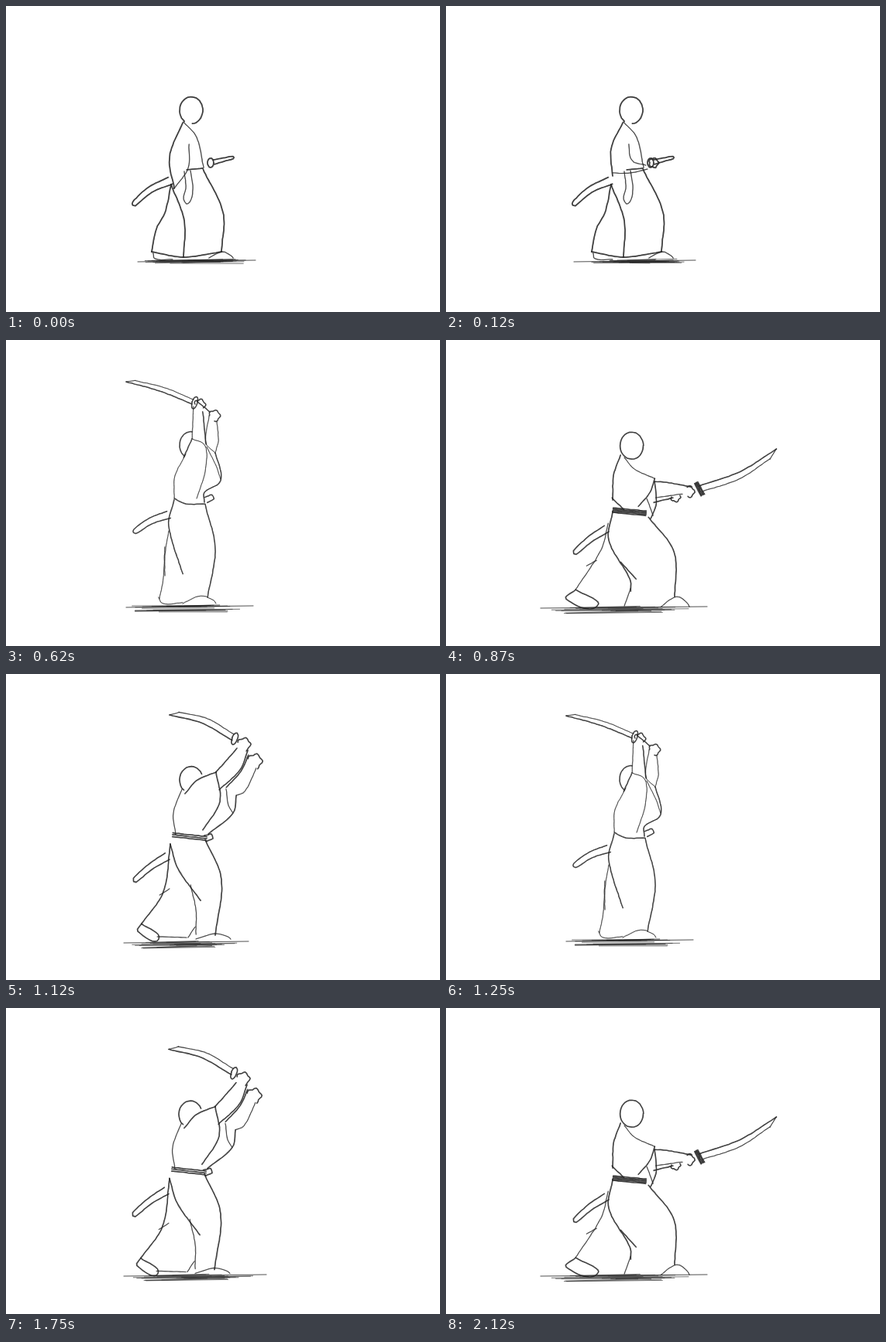
These frames come from a looping animation (560x396 px, 2.25 s). An HTML page:

```html
<!DOCTYPE html>
<html lang="en">
<head>
<meta charset="utf-8">
<title>Sword practice</title>
<style>
html, body { margin: 0; width: 100%; height: 100%; overflow: hidden; background: #fff; }
svg { display: block; width: 100%; height: 100%; }
path { fill: none; stroke: #242424; stroke-linecap: round; stroke-linejoin: round; }
</style>
</head>
<body>
<svg id="stage" viewBox="0 0 560 396"></svg>
<script>
const NS = 'http://www.w3.org/2000/svg';
const stage = document.getElementById('stage');
let layer, weight, seed, offset = [0, 0];

const rand = () => (seed = (seed * 16807) % 2147483647) / 2147483647;
const noise = size => (rand() - .5) * size;

function addPath(d, width, opacity) {
  const path = document.createElementNS(NS, 'path');
  path.setAttribute('d', d);
  path.style.strokeWidth = width;
  path.style.strokeOpacity = opacity;
  layer.append(path);
}

// Samples a smooth line through flat x, y pairs.
function sample(flat) {
  const p = [];
  for (let i = 0; i < flat.length; i += 2) p.push([flat[i] + offset[0], flat[i + 1] + offset[1]]);
  const at = i => p[Math.max(0, Math.min(p.length - 1, i))];
  const out = [p[0]];
  for (let i = 0; i < p.length - 1; i++) {
    const [a, b, c, e] = [at(i - 1), at(i), at(i + 1), at(i + 2)];
    const len = Math.hypot(c[0] - b[0], c[1] - b[1]);
    const toward = (from, to) => {
      const d = Math.hypot(to[0] - from[0], to[1] - from[1]) || 1;
      return [0, 1].map(k => (to[k] - from[k]) / d * len / 3);
    };
    const [u, v] = [toward(a, c), toward(b, e)];
    const steps = Math.ceil(len / 4);
    for (let s = 1; s <= steps; s++) {
      const t = s / steps, r = 1 - t;
      out.push([0, 1].map(k => r * r * r * b[k] + 3 * r * r * t * (b[k] + u[k])
        + 3 * r * t * t * (c[k] - v[k]) + t * t * t * c[k]));
    }
  }
  return out;
}

// Two shaky passes of the pencil.
function stroke(flat, heavy) {
  const points = sample(flat);
  for (const [shake, width, opacity] of [[.5, 1, .75], [1.1, .6, .6]]) {
    const d = 'M' + points.map(([x, y]) => `${x + noise(shake)},${y + noise(shake)}`).join('L');
    addPath(d, weight * heavy * width, opacity);
  }
}

const curve = (...p) => stroke(p, 1);
const bold = (...p) => stroke(p, 1.5);

function ellipse(cx, cy, rx, ry, from = 0, to = 360, turn = 0, knuckle = 0) {
  const points = [];
  for (let i = 0; i <= 16; i++) {
    const a = (from + (to - from) * i / 16) * Math.PI / 180;
    const r = 1 + knuckle * Math.cos(5 * a);
    const [x, y] = [rx * r * Math.cos(a), ry * r * Math.sin(a)];
    points.push(cx + x * Math.cos(turn) - y * Math.sin(turn), cy + x * Math.sin(turn) + y * Math.cos(turn));
  }
  bold(...points);
}
const head = (cx, cy, from, to) => ellipse(cx, cy, 15, 17.5, from, to);
const fist = (x, y, r, from = 0, to = 360) => ellipse(x, y, r, r, from, to, 0, .13);

// Gives points beside a bent axis: t runs along it, w across it.
function axis(x0, y0, x1, y1, bend) {
  const [dx, dy] = [x1 - x0, y1 - y0];
  const len = Math.hypot(dx, dy);
  return (t, w) => {
    const side = w + 4 * bend * t * (1 - t);
    return [x0 + dx * t - dy / len * side, y0 + dy * t + dx / len * side];
  };
}

function tube(x0, y0, x1, y1, w0, w1, bend = 0) {
  const at = axis(x0, y0, x1, y1, bend);
  const mid = (w0 + w1) / 2;
  bold(...at(0, w0), ...at(.5, mid), ...at(1, w1), ...at(1.04, 0), ...at(1, -w1), ...at(.5, -mid), ...at(0, -w0));
}

// Parallel lines; many of them make a solid band.
function band(x0, y0, x1, y1, height, lines) {
  const at = axis(x0, y0, x1, y1, 0);
  for (let i = 0; i < lines; i++) {
    const w = height * (i / (lines - 1) - .5);
    bold(...at(0, w), ...at(1, w));
  }
}

function blade(x0, y0, x1, y1, w, bend, solidGuard) {
  const at = axis(x0, y0, x1, y1, bend);
  curve(...at(0, w), ...at(.45, w), ...at(.88, w));
  curve(...at(.88, w), ...at(1, 0));
  bold(...at(0, -w), ...at(.5, -w), ...at(1, 0));
  if (solidGuard) band(...at(-.02, -9), ...at(-.02, 9), 5, 5);
  else ellipse(...at(-.03, 0), 3.5, 8, 0, 360, Math.atan2(y1 - y0, x1 - x0));
}

const foot = (x0, x1, y, height) => curve(x0, y, x0 + (x1 - x0) * .55, y - height, x1 - 3, y - height * .4, x1, y);

// A long line with loose hatching under the feet.
function ground(x0, x1, y, depth) {
  const span = x1 - x0;
  addPath(`M${x0},${y + 1}L${x1},${y - 1}`, 1, .8);
  for (let i = 0; i < 15; i++) {
    const left = x0 + span * (.04 + .45 * rand());
    const right = x1 - span * (.08 + .35 * rand());
    const top = y - 2 + (depth + 2) * rand() ** 1.3;
    addPath(`M${left},${top + 1}L${right},${top + noise(3)}`, .9, .7);
  }
}

function standBody() {
  head(239, 135, 125, 445);
  curve(229, 150, 246, 170, 255, 209);
  bold(233, 212, 254, 210);
  curve(230, 214, 232, 236, 229, 250, 235, 256, 241, 240, 238, 213);
  tube(212, 226, 165, 256, 5, 3, 4);
  ellipse(264, 203, 4, 6);
  tube(268, 202, 293, 196, 3, 1.5);
  bold(213, 231, 205, 268, 194, 288, 188, 318);
  bold(213, 231, 230, 278, 229, 325);
  bold(254, 211, 280, 267, 278, 318);
  bold(188, 318, 229, 325, 278, 318);
  curve(190, 319, 192, 327, 215, 328);
  foot(262, 293, 326, 8);
}

function restArm() {
  bold(228, 151, 211, 195, 217, 236);
  curve(217, 236, 235, 210, 236, 179);
}

function gripArm() {
  bold(228, 151, 213, 185, 215, 220);
  curve(236, 179, 240, 200, 258, 206);
  curve(215, 216, 238, 216, 260, 211);
  fist(268, 203, 6);
}

// The free hand stays at the belt while the other draws the sword to x, y.
const reach = (x, y) => () => {
  head(239, 136, 100, 425);
  curve(229, 150, 238, 161, 281, 159);
  curve(227, 151, 198, 192, 199, 230);
  curve(226, 155, 218, 182, 219, 212);
  bold(219, 209, 240, 218, 264, 204);
  band(214, 216, 257, 220, 4, 2);
  ellipse(215, 212, 4, 7);
  curve(211, 206, 205, 230);
  tube(213, 230, 175, 253, 5, 3, 1);
  curve(281, 160, 266, 198, 258, 217);
  curve(281, 159, x - 8, y - 1);
  bold(270, 192, x - 4, y + 7);
  fist(x, y, 7);
  tube(x + 5, y - 6, x + 21, y - 14, 2, 2);
  curve(212, 221, 203, 270, 202, 303);
  curve(202, 283, 193, 306, 184, 331);
  bold(257, 223, 254, 272, 236, 345);
  bold(258, 228, 284, 272, 284, 338);
  bold(184, 330, 228, 341);
  curve(184, 332, 205, 344, 224, 345);
  foot(240, 290, 345, 9);
};

function raiseArms() {
  blade(241, 80, 155, 54, 3, 4);
  bold(246, 79, 263, 93);
  fist(250, 84, 7, 190, 400);
  fist(269, 98, 7, 180, 450);
  curve(242, 86, 240, 127);
  bold(254, 93, 258, 135);
  curve(262, 98, 258, 133, 270, 146);
  curve(272, 105, 274, 130, 270, 146);
}

function raiseBody() {
  head(239, 136, 125, 275);
  bold(229, 152, 240, 128);
  curve(240, 128, 257, 137, 257, 170, 246, 205);
  curve(232, 148, 218, 176, 217, 205);
  curve(259, 138, 271, 163, 277, 180);
  bold(270, 146, 277, 182, 256, 197, 256, 210);
  bold(217, 205, 232, 212, 257, 212);
  tube(258, 207, 267, 203, 4, 3);
  tube(210, 226, 166, 248, 5, 3, 3);
  bold(217, 207, 210, 240, 228, 303);
  curve(210, 247, 205, 280, 205, 305);
  curve(205, 268, 203, 308, 198, 335);
  bold(257, 213, 270, 270, 260, 333);
  curve(197, 333, 202, 341, 228, 340);
  foot(228, 271, 341, 10);
}

function swing() {
  blade(293, 82, 211, 53, 4, 8);
  fist(307, 91, 8, 200, 430);
  fist(321, 113, 9, 200, 430);
  bold(298, 96, 286, 110, 271, 127);
  bold(312, 99, 302, 124, 275, 150);
  bold(313, 105, 303, 126, 284, 147);
  curve(323, 122, 308, 152, 297, 157);
  head(239, 137, 130, 335);
  bold(231, 155, 246, 138, 271, 127);
  curve(227, 149, 216, 180, 219, 208);
  bold(271, 127, 276, 165, 254, 202);
  curve(284, 149, 287, 170, 293, 180);
  bold(297, 157, 293, 180, 261, 207);
  band(215, 208, 259, 213, 5, 3);
  tube(257, 213, 266, 210, 4, 3);
  tube(208, 236, 166, 267, 5, 3, 2);
  bold(212, 220, 203, 282, 175, 323);
  bold(212, 220, 222, 252, 251, 293);
  curve(198, 286, 211, 278);
  curve(238, 273, 245, 305, 245, 337);
  bold(257, 214, 278, 266, 270, 338);
  bold(175, 323, 170, 333, 197, 343, 175, 323);
  curve(195, 340, 233, 341);
  curve(235, 341, 244, 327);
  foot(245, 290, 343, 7);
}

function cut() {
  head(238.5, 137.5, 0, 360);
  curve(229, 153, 242, 168, 268, 180);
  bold(224, 150, 215, 176, 214, 208);
  bold(268, 180, 262, 198, 247, 216);
  bold(268, 184, 270, 212, 263, 232);
  curve(258, 206, 266, 228);
  bold(213, 205, 228, 220);
  band(214, 221, 257, 225, 6, 5);
  tube(206, 245, 165, 276, 5, 3, 2);
  bold(268, 184, 283, 185, 315, 191);
  bold(267, 211, 292, 205);
  curve(269, 205, 304, 200);
  fist(312, 197, 7, 250, 460);
  fist(295, 204, 6, -20, 180);
  blade(328, 193, 425, 142, 4, 8, true);
  curve(208, 238, 199, 272, 166, 324);
  curve(180, 293, 193, 286);
  bold(214, 222, 209, 260, 236, 310, 237, 326);
  curve(237, 322, 229, 345);
  bold(224, 288, 244, 310);
  bold(260, 230, 293, 275, 294, 333);
  bold(166, 324, 154, 336, 194, 345, 166, 324);
  foot(276, 313, 346, 13);
}

const shift = (dx, dy, part) => () => {
  offset = [dx, dy];
  part();
  offset = [0, 0];
};

function pose(width, floor, ...parts) {
  layer = document.createElementNS(NS, 'g');
  layer.style.display = 'none';
  weight = width;
  seed = 77;
  parts.forEach(part => part());
  ground(...floor);
  stage.append(layer);
  return layer;
}

const stand = pose(1.2, [170, 322, 330, 2], standBody, restArm);
const grip = pose(1.2, [165, 322, 330, 2], standBody, gripArm);
const pull = pose(1, [161, 325, 347, 3], reach(304, 172));
const drawn = pose(1, [161, 325, 347, 3], reach(333, 148));
const lift = pose(1, [148, 319, 346, 10], raiseBody, shift(12, 10, raiseArms));
const raise = pose(1, [155, 319, 345, 8], raiseBody, raiseArms);
const swingDown = pose(1.1, [152, 336, 346, 6], shift(-1, .5, swing));
const swingUp = pose(1.1, [152, 313, 347, 7], swing);
const cutLow = pose(1.1, [122, 335, 346, 10], cut);
const cutHigh = pose(1.1, [122, 337, 346, 7], shift(1.2, -.8, cut));

const LOOP = 2250;
const steps = [
  [0, stand], [120, grip], [250, pull], [370, drawn], [500, lift],
  [620, raise], [750, swingDown], [870, cutHigh], [1120, swingUp], [1250, raise],
  [1500, cutLow], [1750, swingDown], [1870, raise], [2120, cutHigh]
];

let shown = null;
function render(ms) {
  const t = ms % LOOP;
  const next = steps.filter(([start]) => start <= t).pop()[1];
  if (next === shown) return;
  if (shown) shown.style.display = 'none';
  next.style.display = '';
  shown = next;
}

const begin = performance.now();
function tick() {
  render(performance.now() - begin);
  requestAnimationFrame(tick);
}
tick();
</script>
</body>
</html>
```
